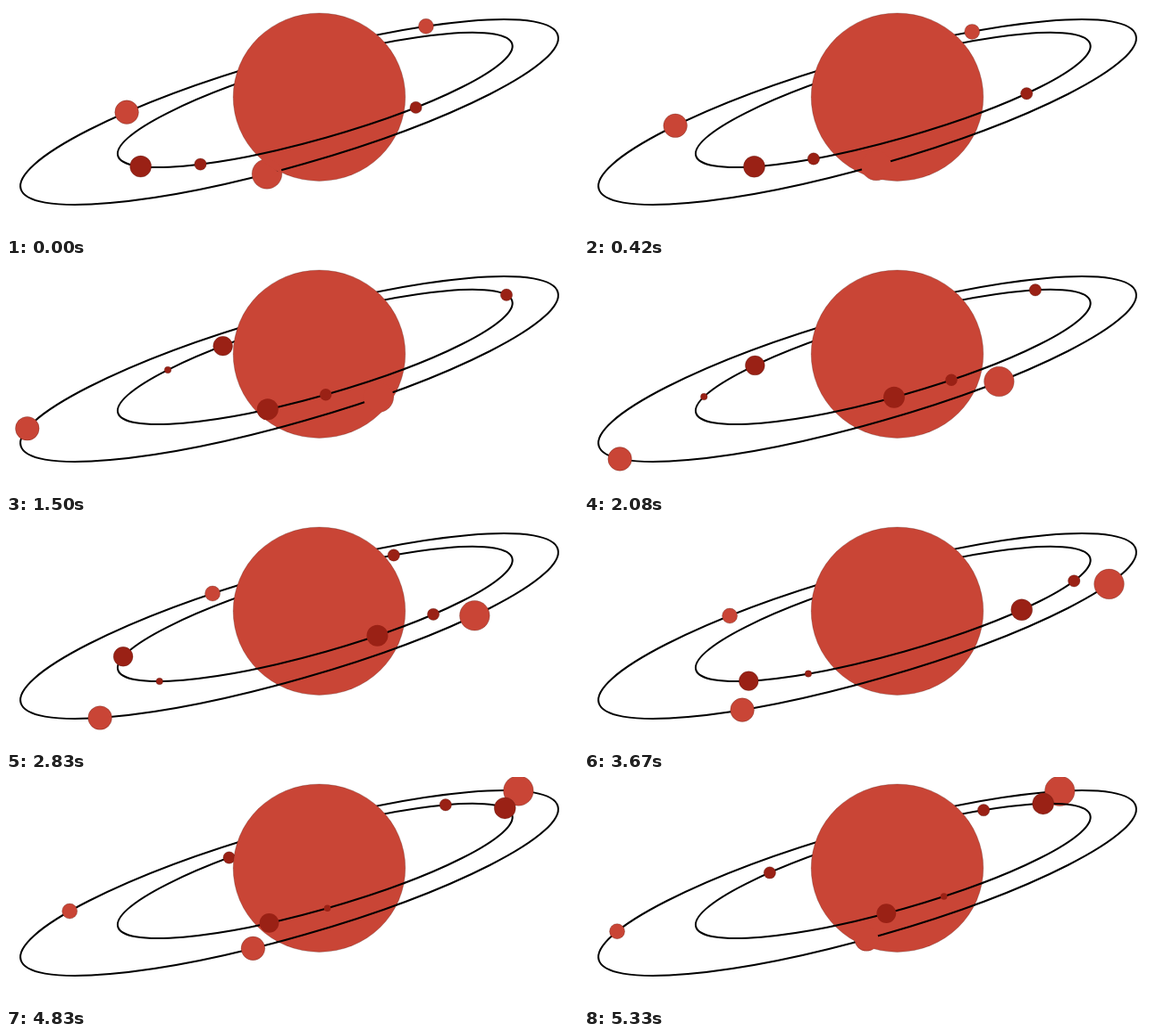
Write an HTML page with a canvas that moves like this. It is 640 px wide and 257 px high and loops after 5410 ms.

```html
<!DOCTYPE html>
<html lang="en">
<head>
<meta charset="utf-8">
<title>Planets in orbit</title>
<style>
  html, body { margin: 0; width: 100%; height: 100%; overflow: hidden; background: #fff; }
  canvas { display: block; width: 640px; height: 257px; }
</style>
</head>
<body>
<canvas id="stage" width="640" height="257"></canvas>
<script>
const ctx = document.getElementById('stage').getContext('2d');
const TAU = Math.PI * 2;
const LOOP = 5410;
const LAST = 5.305; // seconds of motion reached at the end of the loop
const LIGHT = '#c94536';
const DARK = '#9a2115';
const RIM = 'rgba(70, 20, 12, 0.45)';
const SUN = { x: 350.5, y: 102.2, rx: 96.3, ry: 94.2 };

// Planets: r = radius, at = share of the orbit already covered at time 0
const rings = [
  {
    x: 317, y: 119, a: 312.6, b: 60.4, tilt: 0.2798, period: 15.06, color: LIGHT,
    planets: [{ r: 8.5, at: 0.1172 }, { r: 13.3, at: 0.3838 }, { r: 16.8, at: 0.717 }]
  },
  {
    x: 345.8, y: 105.4, a: 229.3, b: 44, tilt: 0.277, period: 10.04, color: DARK,
    planets: [
      { r: 10.9, at: 0.2005 }, { r: 3.8, at: 0.2705 }, { r: 12, at: 0.5307 },
      { r: 6.7, at: 0.6005 }, { r: 6.7, at: 0.8607 }
    ]
  }
];

// Cumulative arc length, so that planets keep a constant speed
const STEPS = 1440;
for (const ring of rings) {
  ring.len = [0];
  for (let i = 0; i < STEPS; i++) {
    const v = (i + 0.5) / STEPS * TAU;
    const speed = Math.hypot(ring.a * Math.sin(v), ring.b * Math.cos(v));
    ring.len.push(ring.len[i] + speed * TAU / STEPS);
  }
}

function angleAt(ring, share) {
  const goal = share * ring.len[STEPS];
  let lo = 0, hi = STEPS;
  while (hi - lo > 1) {
    const mid = (lo + hi) >> 1;
    if (ring.len[mid] <= goal) lo = mid; else hi = mid;
  }
  return (lo + (goal - ring.len[lo]) / (ring.len[hi] - ring.len[lo])) / STEPS * TAU;
}

function pointAt(ring, v) {
  const p = ring.a * Math.cos(v), q = -ring.b * Math.sin(v);
  const c = Math.cos(ring.tilt), s = Math.sin(ring.tilt);
  return [ring.x + p * c + q * s, ring.y - p * s + q * c];
}

function sunPath(grow) {
  ctx.beginPath();
  ctx.ellipse(SUN.x, SUN.y, SUN.rx + grow, SUN.ry + grow, 0, 0, TAU);
}

function strokeWith(color, width) {
  ctx.strokeStyle = color;
  ctx.lineWidth = width;
  ctx.stroke();
}

function drawRings(time, frontOnly) {
  for (const ring of rings) {
    ctx.beginPath();
    ctx.ellipse(ring.x, ring.y, ring.a, ring.b, -ring.tilt, 0, frontOnly ? Math.PI : TAU);
    strokeWith('#000', 2);
    ctx.fillStyle = ring.color;
    for (const planet of ring.planets) {
      const share = (planet.at + time / ring.period) % 1;
      if (frontOnly && share < 0.5) continue;
      const [x, y] = pointAt(ring, angleAt(ring, share));
      ctx.beginPath();
      ctx.arc(x, y, planet.r, 0, TAU);
      ctx.fill();
      if (!frontOnly) strokeWith(RIM, 0.6);
    }
  }
}

function draw(time) {
  ctx.fillStyle = '#fff';
  ctx.fillRect(0, 0, 640, 257);
  drawRings(time, false);

  ctx.fillStyle = LIGHT;
  sunPath(0);
  ctx.fill();
  strokeWith(RIM, 0.6);

  // The near half of each orbit passes in front of the sun
  ctx.save();
  sunPath(1);
  ctx.clip();
  drawRings(time, true);
  ctx.restore();
}

// Motion advances in twelve steps per second, timed to 10 ms
function stepAt(ms) {
  const i = Math.floor((ms + 5) * 0.012);
  return Math.round(i * 25 / 3) * 10 > ms ? i - 1 : i;
}

const start = performance.now();
function tick() {
  const ms = (performance.now() - start) % LOOP;
  draw(Math.min(stepAt(ms) / 12, LAST));
  requestAnimationFrame(tick);
}
tick();
</script>
</body>
</html>
```
